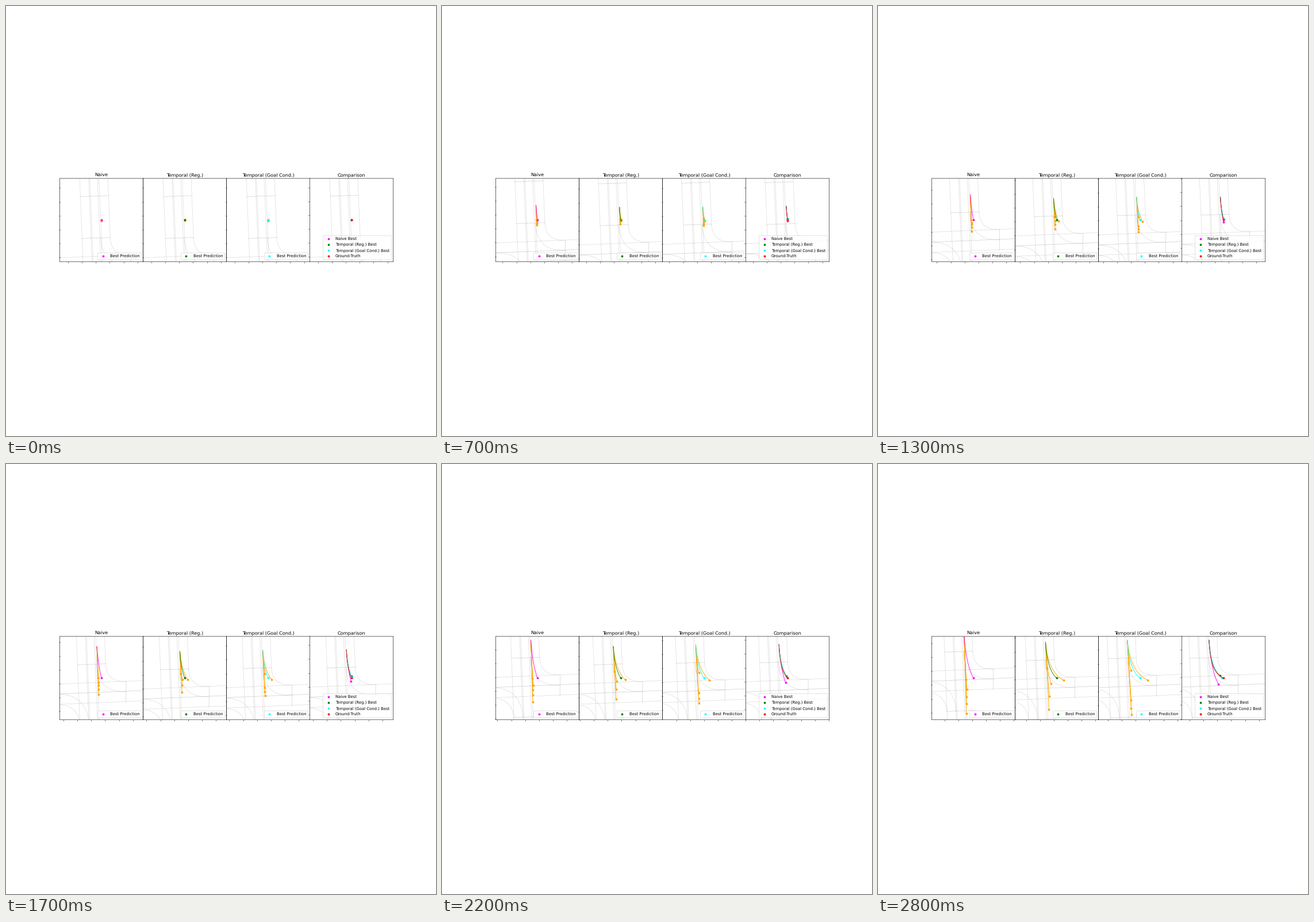
Animation, 748 px wide and 748 px high, one loop 2900 ms. Source, as a matplotlib script:

```python
import numpy as np
import matplotlib.pyplot as plt
from matplotlib.animation import FuncAnimation

STAGE, DPI, FRAMES = 748, 64, 29
PX = 72 / DPI                       # points per pixel
SIDE = STAGE * 0.775 / 4            # panel width in pixels
HALF = SIDE / 2
LEFT, BOTTOM = 93.65, STAGE - 444.85
TICK = SIDE / 6

plt.rcParams.update({
    "font.family": "DejaVu Sans",
    "text.hinting": "none",
    "axes.linewidth": 0.6 * PX,
})

T = np.arange(FRAMES) / (FRAMES - 1)


def poly(coefs):
    return sum(c * T ** k for k, c in enumerate(coefs))


def path(xs, ys):
    """Positions over time, in pixels from the start, y pointing down."""
    return np.column_stack([poly(xs), poly(ys)])


NAIVE = path((0, 8, 8.5), (0, 112, -35))
REG = path((0, 5.5, 14), (0, 97.9, -35.6))
GOAL = path((0, 5.3, 16.7), (0, 102.5, -37))
TRUTH = path((0, 5.5, 7, 12.5), (0.8, 103.1, -37.7))

NAIVE_MODES = [
    path((0, 3.5, -0.5), (0.5, 106, -26.5)),
    path((0, 5, 0), (1, 111, -15.5)),
    path((0, 5, -0.5), (0.5, 113, -3.5)),
    path((0, 5, -0.5), (1, 121)),
    path((0, 5, -1), (1.5, 132, 5)),
]
REG_MODES = [
    path((0, 3.5, -1.5), (0, 92, -47)),
    path((0, 3, 6.5), (0, 94, -22)),
    path((0, 6, 0.5), (0.5, 100, -7)),
    path((0, 5.8), (1, 112, 4)),
    path((0, 8, 23), (0, 102, -36)),
]
GOAL_MODES = [
    path((0, 6, 0.5), (0, 92, -39.5)),
    path((0, 6, 0.5), (1, 108, -4.5)),
    path((0, 6, 0.5), (1, 118, -0.5)),
    path((0, 6, 1.5), (1.5, 126, 2)),
    path((0, 9, 26), (0, 109, -40)),
]

TILT = 0.041
LANES = (-35, -19.4, -17.5, -4.1, -1.5)
CROSSROADS = (62.7, 80, 98)


def lane(x, y0, y1):
    return [(x + TILT * y0, y0), (x + TILT * y1, y1)]


def crossroad(y, x0, x1):
    return [(x0, y - TILT * x0), (x1, y - TILT * x1)]


def turn(start, corner, end):
    u = np.linspace(0, 1, 30)[:, None]
    a, b, c = map(np.array, (start, corner, end))
    return (1 - u) ** 2 * a + 2 * u * (1 - u) * b + u ** 2 * c


ROADS = [lane(x, -100, 170) for x in LANES]
ROADS += [lane(14, -100, 31)]
ROADS += [crossroad(y, -110, 130) for y in CROSSROADS]
ROADS += [
    turn((15.3, 31), (16.5, 62), (50.5, 61)),
    turn((-1, 31), (1, 80), (50.5, 79)),
    turn((-72, 83), (-18, 81), (-13.5, 135)),
    turn((-72, 101), (-33, 100), (-29.5, 135)),
]
MARKS = [
    [(-37.3, -40.8), (12.4, -42.5)],
    [(-33.8, 31.9), (15.2, 30.3)],
    [(-29.5, 135), (18.5, 133)],
    [(51, 61), (50.5, 97)],
]


class Track:
    """A trajectory that grows behind its moving dot."""

    def __init__(self, ax, points, color, label=None):
        self.points = points
        self.line, = ax.plot([], [], color=color, lw=0.85 * PX, zorder=2)
        self.dot = ax.scatter([0], [0], s=(3.8 * PX) ** 2, color=color,
                              linewidths=0, zorder=1, label=label,
                              snap=False)

    def show(self, i):
        self.line.set_data(*self.points[:i + 1].T)
        self.dot.set_offsets(self.points[i])


def draw_map(ax, lines, alpha):
    for line in lines:
        ax.plot(*np.array(line).T, color="grey", alpha=alpha,
                lw=0.7 * PX, zorder=0, snap=False)


def make_axes(fig, col, title):
    ax = fig.add_axes([(LEFT + col * SIDE) / STAGE, BOTTOM / STAGE,
                       SIDE / STAGE, SIDE / STAGE])
    ax.set_title(title, fontsize=8.17 * PX, pad=3.8 * PX)
    for spine in ax.spines.values():
        spine.set_snap(False)
    steps = TICK * np.arange(-12, 13)
    ax.set_xticks(steps - 9.8)
    ax.set_yticks(steps - 7.6)
    ax.tick_params(length=2.3 * PX, width=0.6 * PX,
                   labelbottom=False, labelleft=False)
    draw_map(ax, ROADS, 0.28)
    draw_map(ax, MARKS, 0.35)
    draw_map(ax, [crossroad(CROSSROADS[1], -110, 130)], 0.12)
    return ax


def add_legend(ax):
    legend = ax.legend(loc="lower right", fontsize=6.82 * PX)
    legend.get_frame().set_linewidth(0.68 * PX)


fig = plt.figure(figsize=(STAGE / DPI, STAGE / DPI), dpi=DPI,
                 facecolor="white")

panels = []     # (axes, centre path, tracks)
for col, (title, best, color, modes) in enumerate([
    ("Naive", NAIVE, "magenta", NAIVE_MODES),
    ("Temporal (Reg.)", REG, "green", REG_MODES),
    ("Temporal (Goal Cond.)", GOAL, "cyan", GOAL_MODES),
]):
    ax = make_axes(fig, col, title)
    tracks = [Track(ax, p, "orange") for p in modes]
    tracks.append(Track(ax, best, color, "Best Prediction"))
    add_legend(ax)
    panels.append((ax, best, tracks))

ax = make_axes(fig, 3, "Comparison")
tracks = [Track(ax, *row) for row in [
    (NAIVE, "magenta", "Naive Best"),
    (REG, "green", "Temporal (Reg.) Best"),
    (GOAL, "cyan", "Temporal (Goal Cond.) Best"),
    (TRUTH, "red", "Ground-Truth"),
]]
add_legend(ax)
panels.append((ax, TRUTH, tracks))


def draw(i):
    for ax, centre, tracks in panels:
        x, y = centre[i]
        ax.set_xlim(x - HALF, x + HALF)
        ax.set_ylim(y + HALF, y - HALF)
        for track in tracks:
            track.show(i)
    return []


anim = FuncAnimation(fig, draw, frames=FRAMES, interval=100,
                     init_func=lambda: draw(0), repeat=True, blit=False)
plt.show()
```
